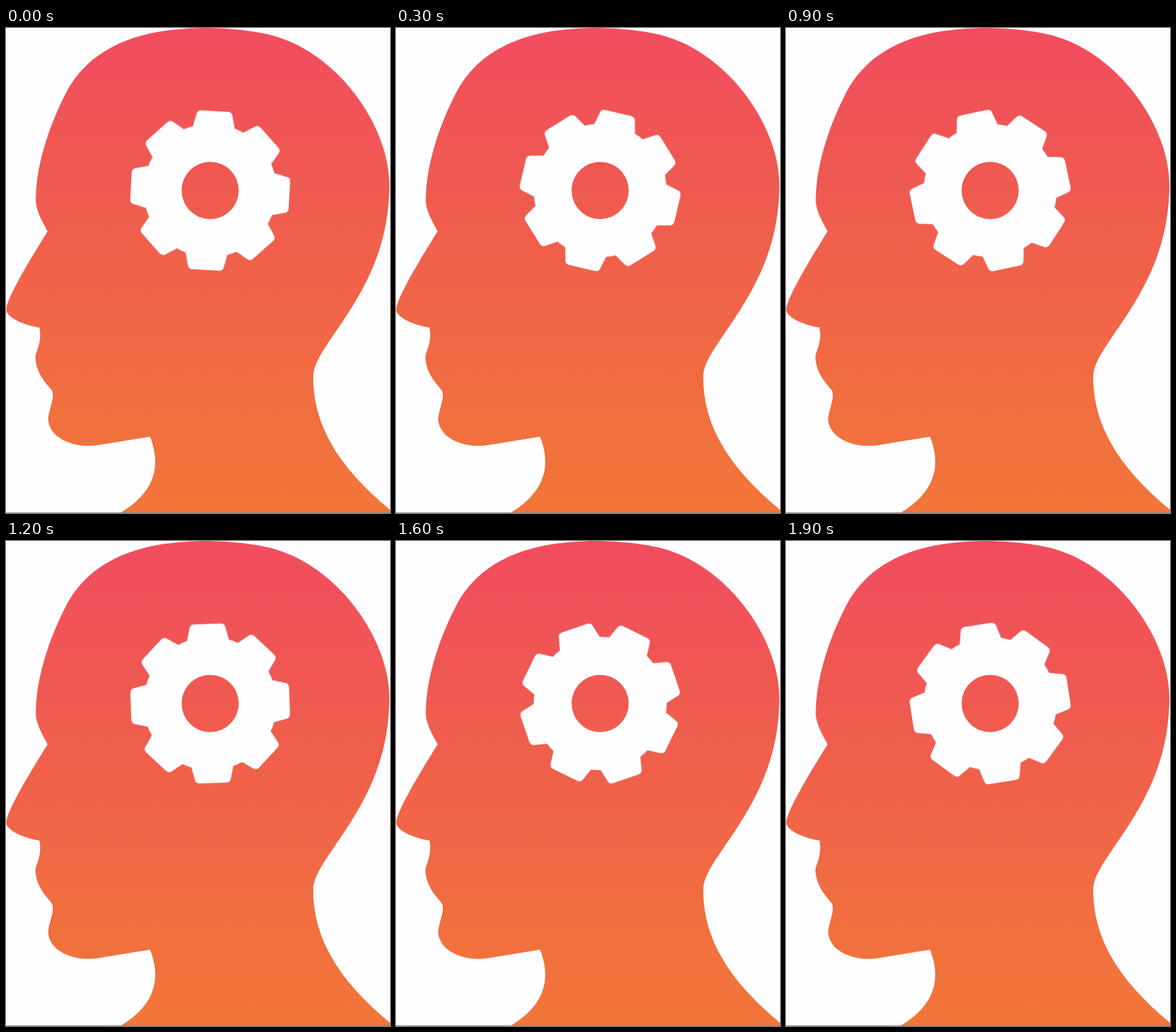
An HTML page without scripts for the animation above (2 s loop, 600x756 px).

```html
<!DOCTYPE html>
<html lang="en">
<head>
<meta charset="utf-8">
<title>Thinking head</title>
<style>
  html, body { margin: 0; width: 100%; height: 100%; overflow: hidden; background: #fefdff; }
  svg { display: block; width: 100%; height: 100%; }
  .paper { fill: #fefdff; }
  /* 59 ticks per turn, three ticks per step */
  .gear { animation: turn 2s steps(20, end) infinite; }
  @keyframes turn {
    from { transform: rotate(3.3deg); }
    to { transform: rotate(369.4deg); }
  }
</style>
</head>
<body>
<svg viewBox="0 0 600 756">
  <defs>
    <linearGradient id="skin" gradientUnits="userSpaceOnUse" x1="0" y1="0" x2="0" y2="756">
      <stop offset="0" stop-color="#f24c5f"/>
      <stop offset=".33" stop-color="#ef5a50"/>
      <stop offset=".6" stop-color="#f16647"/>
      <stop offset=".8" stop-color="#f0703e"/>
      <stop offset="1" stop-color="#f2763a"/>
    </linearGradient>
    <path id="tooth" d="M-32.7-98.7L-28-118.5Q-26.8-124-20.5-124H20.5Q26.8-124 28-118.5L32.7-98.7L0-60Z"/>
    <g id="pair">
      <use href="#tooth"/>
      <use href="#tooth" transform="rotate(180)"/>
    </g>
  </defs>

  <rect class="paper" width="600" height="756"/>

  <path fill="url(#skin)" d="M180 755
    C225 728 246 690 225 637
    L145 650
    C110 656 70 642 66 612
    C65 600 75 580 73 570
    Q73 567 71 564
    C64 555 46 538 46 512
    C46 506 53 498 53.5 478
    L52.5 467
    C25 462 4 452 .5 441
    C-2 428 28 376 65 317
    C57 302 48 287 46.5 271
    C46 220 65 155 96 97
    C128 40 190 2 305 0
    C340 0 372 2 405 9
    C514 31 599 151 599 244
    C599 339 562 404 525 459
    C500 496 480 521 480 544
    C480 620 520 685 600 751
    L604 755Z"/>

  <g transform="translate(319 253.3)">
    <g class="gear paper">
      <circle r="104"/>
      <use href="#pair"/>
      <use href="#pair" transform="rotate(45)"/>
      <use href="#pair" transform="rotate(90)"/>
      <use href="#pair" transform="rotate(135)"/>
    </g>
  </g>
  <circle cx="319" cy="253.3" r="44.6" fill="url(#skin)"/>

  <rect y="755" width="600" height="1" fill="#444" opacity=".6"/>
</svg>
</body>
</html>
```
